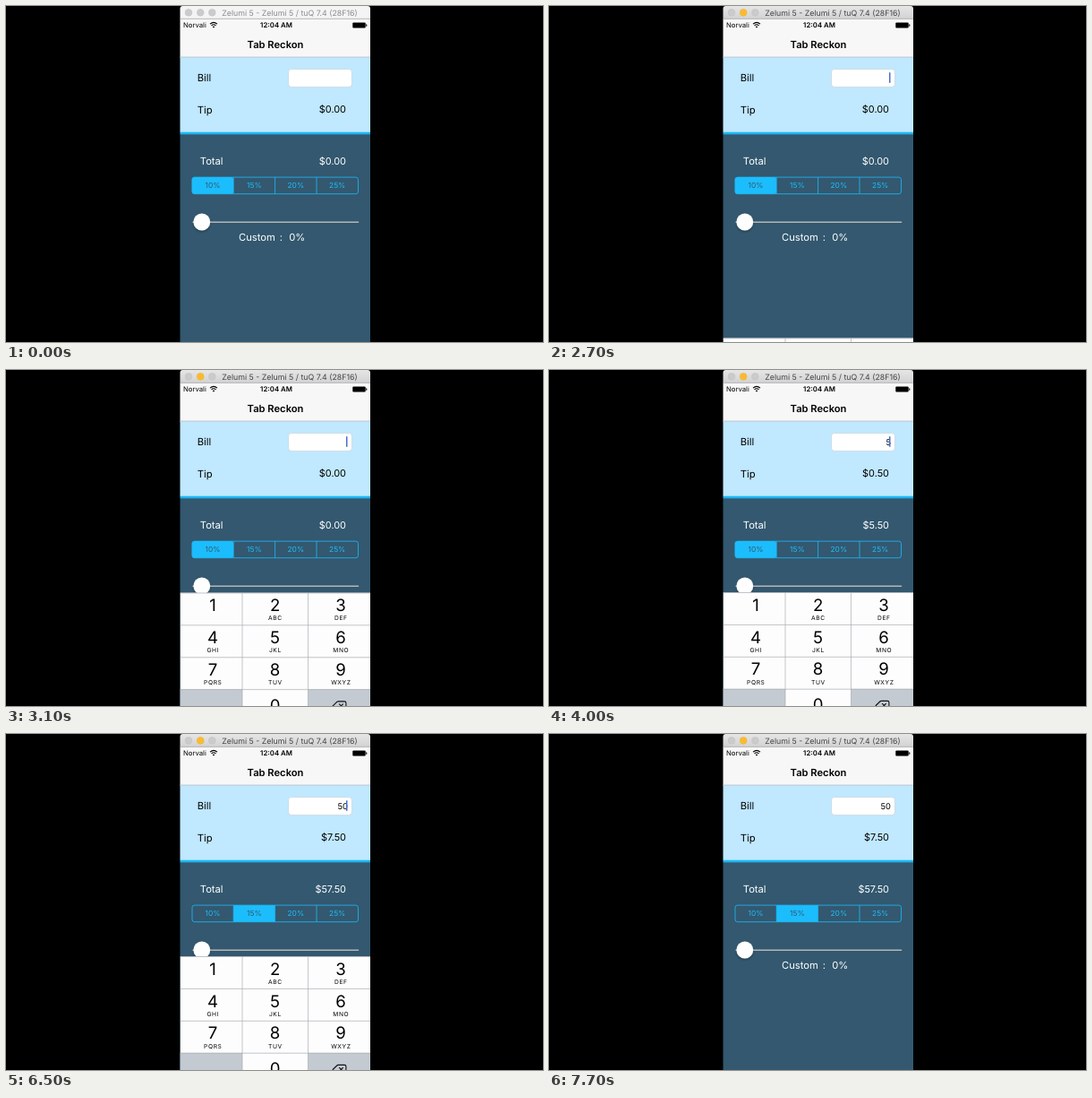
An HTML page that plays this animation: 600 by 375 pixels, repeating every 8000 ms.

```html
<!DOCTYPE html>
<html lang="en">
<head>
<meta charset="utf-8">
<title>Tip calculator</title>
<style>
  html, body { margin: 0; width: 100%; height: 100%; overflow: hidden; background: #000; }
  svg { display: block; width: 600px; height: 375px; font-family: Inter, "Liberation Sans", sans-serif; }
  text { text-rendering: geometricPrecision; }
  .body { font-size: 11.2px; }
  .light { fill: #fff; }
  .money { font-size: 10.9px; text-anchor: end; }
  .end { text-anchor: end; }
  .mid { text-anchor: middle; }
  .seg { font-size: 8.4px; }
  .digit { font-size: 18.6px; }
  .abc { font-size: 6.7px; letter-spacing: .6px; }
</style>
</head>
<body>
<svg viewBox="0 0 600 375">
  <defs>
    <linearGradient id="active" x2="0" y2="1">
      <stop stop-color="#e6e6e6"/><stop offset="1" stop-color="#d2d2d2"/>
    </linearGradient>
    <clipPath id="screen"><rect x="194.5" y="14" width="212.5" height="361"/></clipPath>
    <filter id="shadow" x="-50%" y="-50%" width="200%" height="200%">
      <feDropShadow dx="0" dy="1.5" stdDeviation="1.3" flood-opacity=".3"/>
    </filter>
  </defs>
  <rect width="600" height="375"/>

  <!-- window bar -->
  <path id="bar" d="M194.5 14.5V3q0-3 3-3H404q3 0 3 3V14.5z"/>
  <path d="M194.5 14.2H407" stroke="#b4b4b4" stroke-width=".6"/>
  <g fill="#cbcbcb" stroke="#c0c0c0" stroke-width=".5">
    <circle cx="204" cy="7.3" r="3.9"/>
    <circle id="yellow" cx="217.2" cy="7.3" r="3.9"/>
    <circle cx="230.3" cy="7.3" r="3.9"/>
  </g>
  <text id="caption" class="mid" x="317" y="10.9" font-size="8.8">Zelumi 5 - Zelumi 5 / tuQ 7.4 (28F16)</text>

  <!-- status and navigation -->
  <rect x="194.5" y="14.5" width="212.5" height="43" fill="#f8f7f8"/>
  <text x="198" y="24.3" font-size="7.7">Norvali</text>
  <g fill="none" stroke="#000" stroke-width="1.1">
    <path d="M228 20.2q4-3.7 8 0M229.5 21.9q2.5-2.2 5 0"/>
    <path d="M230.7 22.9q1.3-1 2.6 0L232 24.4z" fill="#000" stroke="none"/>
  </g>
  <text class="mid" x="302" y="24.3" font-size="7.8" font-weight="600">12:04 AM</text>
  <rect x="387.3" y="18.6" width="14.4" height="5.8" rx="1"/>
  <rect x="402.2" y="20.3" width="1.1" height="2.4" rx=".5"/>
  <text class="mid" x="301" y="46.6" font-size="11.2" font-weight="600">Tab Reckon</text>

  <!-- bill and tip -->
  <rect x="194.5" y="57" width="212.5" height="84" fill="#c0e8ff"/>
  <path d="M194.5 57H407" stroke="#b2b8bc" stroke-width=".7"/>
  <g class="body">
    <text x="213.8" y="84.4">Bill</text>
    <text x="213.8" y="119.8">Tip</text>
    <text id="tip" class="money" x="380" y="119.4"></text>
  </g>
  <rect x="315.6" y="70.6" width="70.8" height="19.8" rx="3.3" fill="#fff" stroke="#c9d4da" stroke-width=".7"/>
  <text id="bill" class="end" x="382" y="83.6" font-size="9.3"></text>
  <rect id="caret" x="380" y="74.2" width="1.5" height="11.6" fill="#4a70cc"/>

  <!-- total -->
  <rect x="194.5" y="143" width="212.5" height="232" fill="#33586f"/>
  <rect x="194.5" y="140.7" width="212.5" height="2.6" fill="#1cb7f4"/>
  <g class="body light">
    <text x="216.8" y="177.1">Total</text>
    <text id="total" class="money" x="380" y="177.1"></text>
    <text x="260" y="262.1">Custom</text>
    <text class="mid" x="307.3" y="262.1">:</text>
    <text x="316.2" y="262.1">0%</text>
  </g>
  <g id="segments"></g>
  <rect x="208" y="191.1" width="185.5" height="18.6" rx="2.6" fill="none" stroke="#1cbdfc" stroke-width=".8"/>

  <path d="M209 241.2H393.5" stroke="#b5b6b8" stroke-width="1.6" stroke-linecap="round"/>
  <circle cx="218.8" cy="241" r="9.4" fill="#fff" filter="url(#shadow)"/>

  <g clip-path="url(#screen)"><g id="pad"></g></g>
</svg>

<script>
const $ = id => document.getElementById(id);
const LOOP = 8000, STEP = 100;
const PAD_TOP = 248.2, PAD_HEIGHT = 143.6, ROW = PAD_HEIGHT / 4;
const ACCENT = '#1cbdfc', NAVY = '#33586f';
const RATES = [10, 15, 20, 25];

function add(parent, tag, attrs, text = '') {
  const el = document.createElementNS('http://www.w3.org/2000/svg', tag);
  for (const key in attrs) el.setAttribute(key, attrs[key]);
  el.textContent = text;
  parent.appendChild(el);
  return el;
}

const segments = RATES.map((rate, i) => {
  const w = 46.4, x = 207.8 + i * w;
  const box = add($('segments'), 'rect', { x, y: 191.1, width: w, height: 18.6, rx: i ? 0 : 2.6 });
  if (i) add($('segments'), 'path', { d: `M${x} 191.1v18.6`, stroke: ACCENT, 'stroke-width': .8 });
  const label = add($('segments'), 'text', { class: 'seg mid', x: x + w / 2, y: 203.4 }, rate + '%');
  return { box, label };
});

function buildPad() {
  const pad = $('pad');
  const centers = [231, 300.6, 374];
  const letters = ['', 'ABC', 'DEF', 'GHI', 'JKL', 'MNO', 'PQRS', 'TUV', 'WXYZ'];
  const last = 3 * ROW;
  add(pad, 'rect', { x: 194.5, y: 0, width: 212.5, height: PAD_HEIGHT, fill: '#fdfdfe' });
  add(pad, 'rect', { x: 194.5, y: last, width: 69.5, height: ROW, fill: '#c3cad2' });
  add(pad, 'rect', { x: 337.5, y: last, width: 69.5, height: ROW, fill: '#c3cad2' });
  const lines = [0, 1, 2, 3].map(r => `M194.5 ${r * ROW + .3}H407`).join('');
  add(pad, 'path', { d: lines + 'M264 0v144M337.5 0v144', stroke: '#a9acb0', 'stroke-width': .7 });
  letters.forEach((abc, i) => {
    const x = centers[i % 3], y = Math.floor(i / 3) * ROW;
    add(pad, 'text', { class: 'digit mid', x, y: y + 20.5 }, i + 1);
    add(pad, 'text', { class: 'abc mid', x: x + .3, y: y + 30.6 }, abc);
  });
  add(pad, 'text', { class: 'digit mid', x: centers[1], y: 132.2 }, 0);
  add(pad, 'path', {
    d: 'M365.2 126.3l4.6-4.5q.6-.6 1.4-.6h7q1.7 0 1.7 1.7v6.8q0 1.7-1.7 1.7h-7q-.8 0-1.4-.6zM372.2 124l4.5 4.5m0-4.5l-4.5 4.5',
    fill: 'none', stroke: '#111', 'stroke-width': 1.1
  });
}

// Critically damped spring, 0 to 1, time in ms
function spring(t) {
  const k = Math.max(0, t) * .01826;
  return 1 - (1 + k) * Math.exp(-k);
}

// One-second blink: on, fade out, off, fade in
function blink(t) {
  if (t < 0) return 1;
  const p = t % 1000;
  if (p < 500) return 1;
  if (p < 650) return (650 - p) / 150;
  return p < 850 ? 0 : (p - 850) / 150;
}

function caretAlpha(t) {
  if (t < 2700 || t >= 6600) return 0;
  return blink(t - (t < 4000 ? 2700 : t < 5400 ? 4230 : 5430));
}

const money = n => '$' + n.toFixed(2);

function draw(t) {
  const active = t >= 2300;
  $('bar').setAttribute('fill', active ? 'url(#active)' : '#f4f4f4');
  $('yellow').setAttribute('fill', active ? '#fdbc2e' : '#cbcbcb');
  $('yellow').setAttribute('stroke', active ? '#e8ac2c' : '#c0c0c0');
  $('caption').setAttribute('fill', active ? '#454545' : '#8c8c8c');

  const bill = t < 4000 ? 0 : t < 5400 ? 5 : 50;
  const choice = t < 6300 ? 0 : 1;
  const tip = bill * RATES[choice] / 100;
  $('bill').textContent = bill || '';
  $('tip').textContent = money(tip);
  $('total').textContent = money(bill + tip);
  segments.forEach(({ box, label }, i) => {
    box.setAttribute('fill', i === choice ? ACCENT : NAVY);
    label.setAttribute('fill', i === choice ? NAVY : ACCENT);
  });

  $('caret').setAttribute('opacity', caretAlpha(t));
  const shown = t < 2700 ? 0 : spring(t - 2663) - spring(t - 6563);
  $('pad').setAttribute('transform', `translate(0 ${PAD_TOP + PAD_HEIGHT * (1 - shown)})`);
}

function tick() {
  const t = (performance.now() - start) % LOOP;
  draw(Math.floor(t / STEP) * STEP);
  requestAnimationFrame(tick);
}

buildPad();
const start = performance.now();
tick();
</script>
</body>
</html>
```
